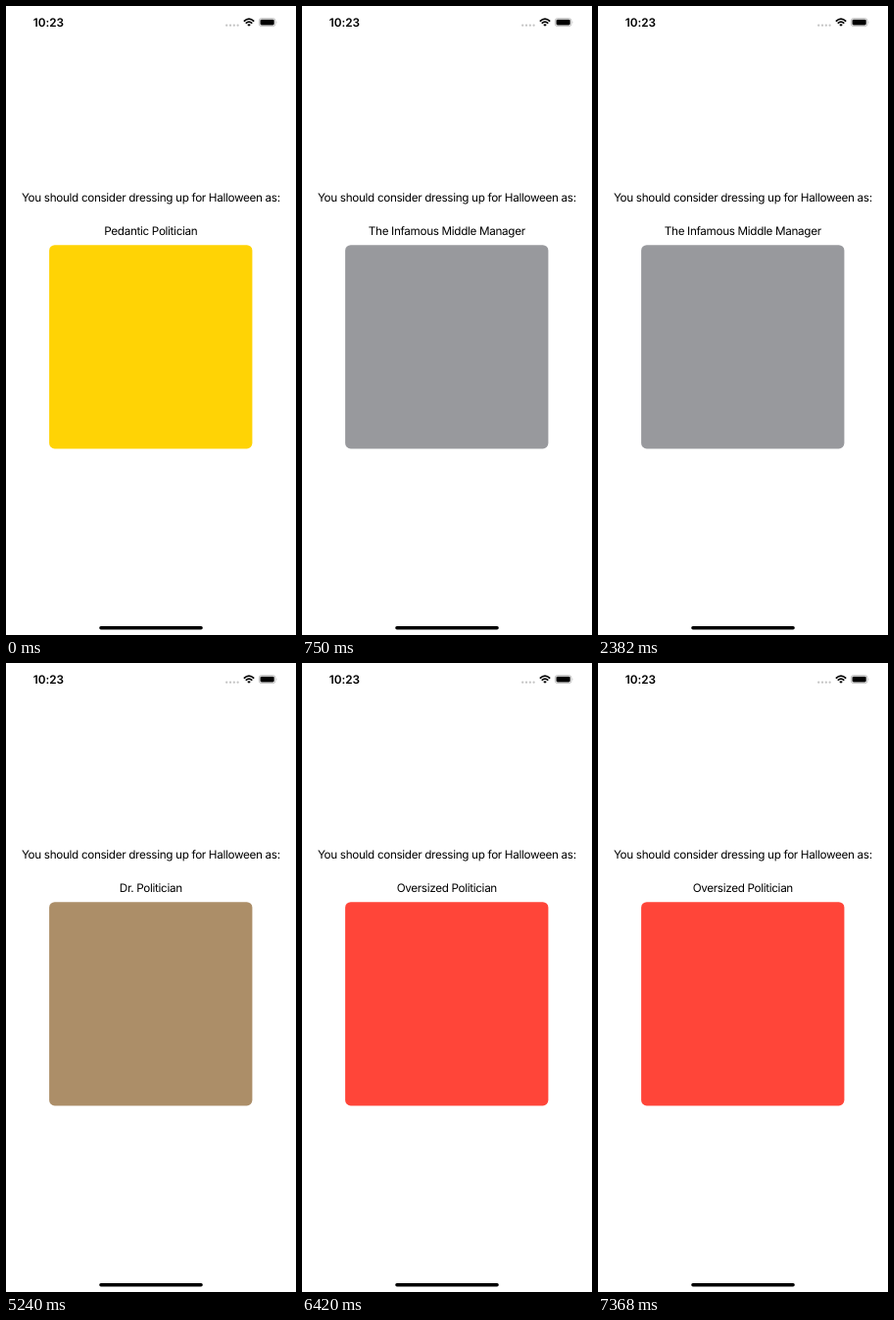
Write an HTML page that moves like this. It is 296x640 px and loops after 8 s.

```html
<!DOCTYPE html>
<html lang="en">
<head>
<meta charset="utf-8">
<title>Costume ideas</title>
<style>
  html, body { margin: 0; width: 100%; height: 100%; overflow: hidden; background: #fff; }
  svg { display: block; width: 100vw; height: 100vh; }
  text { font-family: Inter, "Liberation Sans", sans-serif; fill: #000; text-rendering: geometricPrecision; }
  .body { font-size: 11.7px; letter-spacing: -0.32px; text-anchor: middle; }
  .clock { font-size: 11.8px; font-weight: 600; letter-spacing: -0.05px; text-anchor: middle; }
</style>
</head>
<body>
<svg viewBox="0 0 296 640">
  <rect width="296" height="640" fill="#fff"/>
  <text class="clock" x="43.4" y="21">10:23</text>
  <g fill="#c4c4c4">
    <circle cx="225.2" cy="19.7" r="1.15"/>
    <circle cx="229" cy="19.7" r="1.15"/>
    <circle cx="232.8" cy="19.7" r="1.15"/>
    <circle cx="236.6" cy="19.7" r="1.15"/>
  </g>
  <g fill="none" stroke="#000" stroke-width="1.7">
    <path d="M242.8 15.6 Q248 10.8 253.2 15.6"/>
    <path d="M244.7 17.7 Q248 14.7 251.3 17.7"/>
  </g>
  <path d="M248 20.8 L246.2 19 Q248 17.5 249.8 19 Z"/>
  <rect x="258.3" y="12.6" width="16.6" height="8" rx="2.4" fill="none" stroke="#a6a6a6" stroke-width=".7"/>
  <rect x="259.5" y="13.8" width="14.2" height="5.6" rx="1.3"/>
  <path d="M275.8 15.2 Q277 16.6 275.8 18 Z" fill="#a6a6a6"/>
  <text class="body" x="147.8" y="198.9">You should consider dressing up for Halloween as:</text>
  <text class="body" id="name" x="147.8" y="232.7"></text>
  <rect id="card" x="44.1" y="243.2" width="207.3" height="207.2" rx="5.6"/>
  <rect x="95.2" y="631" width="105.6" height="3.4" rx="1.7"/>
</svg>
<script>
const LOOP = 8000;
const ideas = [
  { at: 0, name: "Pedantic Politician", color: "#ffd305" },
  { at: 750, name: "The Infamous Middle Manager", color: "#98999d" },
  { at: 3470, name: "Dr. Politician", color: "#ac8e68" },
  { at: 6420, name: "Oversized Politician", color: "#ff4539" }
];
const label = document.getElementById("name");
const card = document.getElementById("card");
let shown;

function draw(time) {
  const t = time % LOOP;
  const idea = ideas.findLast(i => i.at <= t);
  if (idea === shown) return;
  shown = idea;
  label.textContent = idea.name;
  card.setAttribute("fill", idea.color);
}

const start = performance.now();
function tick() {
  draw(performance.now() - start);
  requestAnimationFrame(tick);
}
tick();
</script>
</body>
</html>
```
